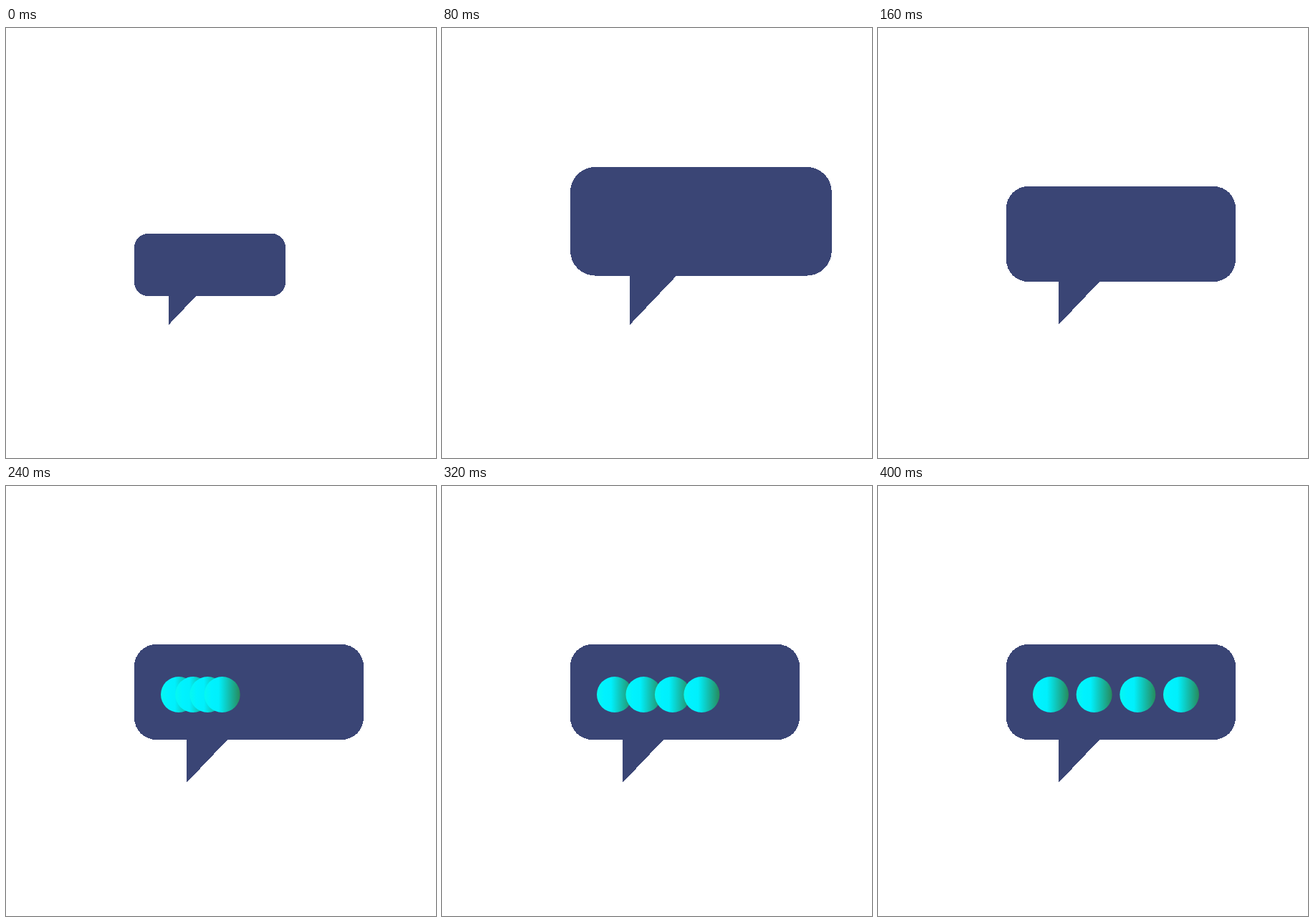
These frames come from a looping animation (600 px wide and 600 px high, 1000 ms). An HTML page:

```html
<!DOCTYPE html>
<html lang="en">
<head>
<meta charset="utf-8">
<title>Typing bubble</title>
<style>
  html, body { margin: 0; width: 100%; height: 100%; overflow: hidden; background: #fff; }
  svg { display: block; width: 100vw; height: 100vh; }
</style>
</head>
<body>
<svg viewBox="0 0 600 600">
  <defs>
    <linearGradient id="shade">
      <stop offset="0" stop-color="#06f8f0"/>
      <stop offset=".2" stop-color="#00f2ff"/>
      <stop offset=".4" stop-color="#00f0fc"/>
      <stop offset="1" stop-color="#278a5c"/>
    </linearGradient>
  </defs>
  <!-- origin is the bottom left, level with the tip of the tail -->
  <g id="bubble" fill="#3a4575" shape-rendering="crispEdges">
    <rect x="0" y="-193" width="320" height="133" rx="30.5"/>
    <path d="M73 -62V0L130 -60V-62Z"/>
  </g>
  <g id="dots" fill="url(#shade)">
    <circle cx="241" cy="291" r="25"/>
    <circle cx="241" cy="291" r="25"/>
    <circle cx="241" cy="291" r="25"/>
    <circle cx="241" cy="291" r="25"/>
  </g>
</svg>
<script>
  const LOOP = 1000, STEP = 40, LAST = 10;
  const SCALES = [0.66, 0.9, 1.14, 1.176, 1];
  const DOTS_FROM = 5, GAP = 60.67;

  const bubble = document.getElementById('bubble');
  const dots = document.getElementById('dots');

  function draw(ms) {
    const n = Math.min(LAST, Math.floor(ms / STEP));
    const scale = SCALES[Math.min(n, SCALES.length - 1)];
    bubble.setAttribute('transform', `translate(179 414) scale(${scale})`);

    dots.style.display = n < DOTS_FROM ? 'none' : '';
    const gap = GAP * (n - DOTS_FROM + 1) / (LAST - DOTS_FROM + 1);
    [...dots.children].forEach((dot, i) => dot.setAttribute('cx', 241 + gap * i));
  }

  const start = performance.now();
  function tick() {
    draw((performance.now() - start) % LOOP);
    requestAnimationFrame(tick);
  }
  tick();
</script>
</body>
</html>
```
